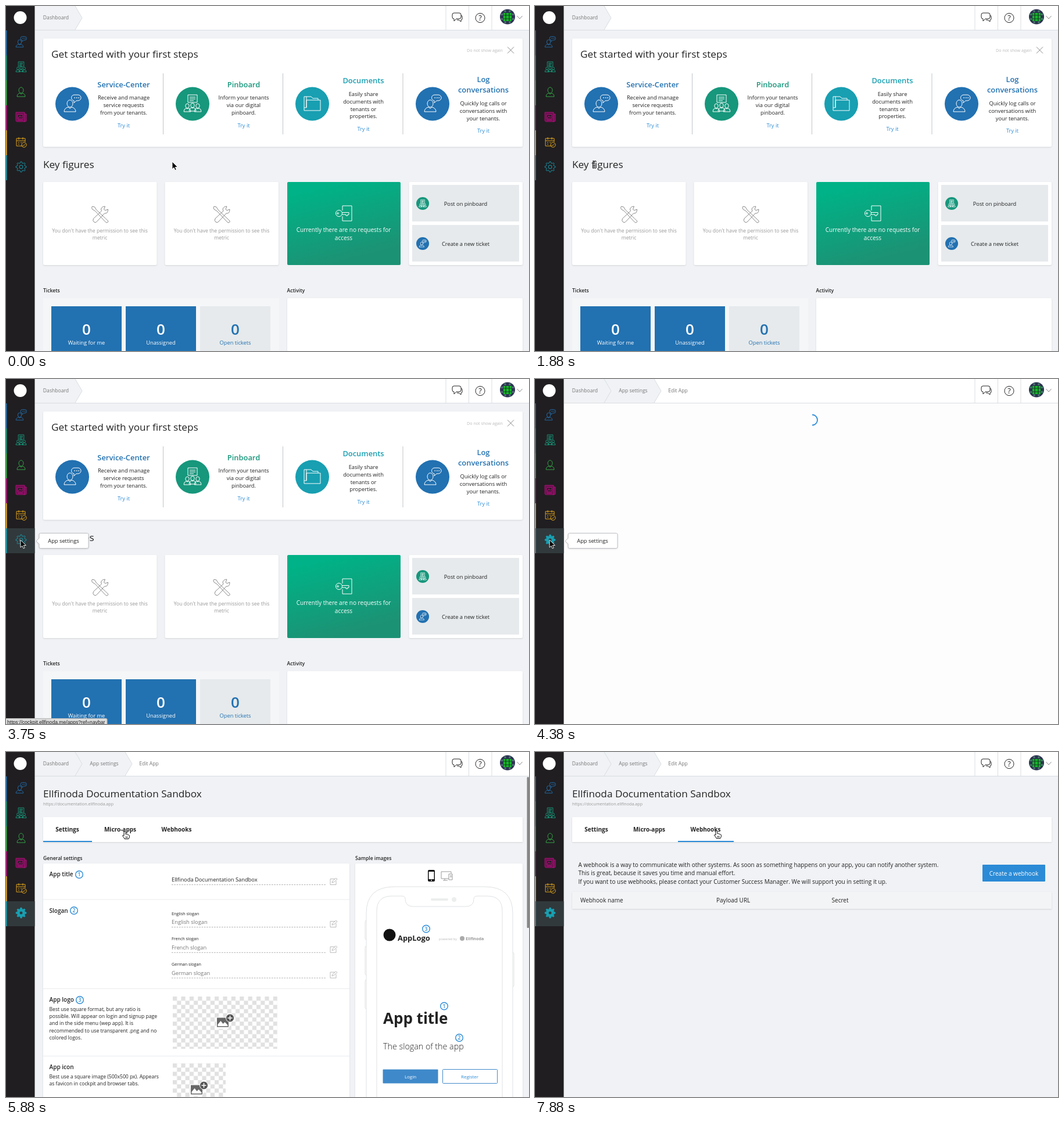
Write an HTML page that moves like this. It is 900 px wide and 594 px high and loops after 8000 ms.

```html
<!DOCTYPE html>
<html lang="en">
<head>
<meta charset="utf-8">
<title>Dashboard to webhooks</title>
<style>
  html, body { margin: 0; width: 100%; height: 100%; overflow: hidden; }
  svg { display: block; width: 900px; height: 594px; font: 9.3px 'Open Sans', sans-serif; fill: #222; }
  #icons * { vector-effect: non-scaling-stroke; }
  .m { text-anchor: middle }
  .xs { font-size: 7.17px } .s { font-size: 8.6px } .l { font-size: 10.04px }
  .xl { font-size: 12.9px } .h { font-size: 17.2px } .n { font-size: 26px }
  .thin { font-weight: 300 } .b { font-weight: 600 } .bb { font-weight: 700 }
  .blue { fill: #2271b1 } .green { fill: #17977c } .teal { fill: #189fb1 }
  .link { fill: #2b8bd6 } .gray { fill: #999 } .mid { fill: #777 } .pale { fill: #bbb } .w { fill: #fff }
  .card { fill: #fff; filter: drop-shadow(0 1px 1px rgba(0, 0, 0, .12)); }
</style>
</head>
<body>
<svg id="stage" viewBox="0 0 900 594"></svg>
<script>
const BRAND = 'Ellfinoda', BLUE = '#2271b1', GREEN = '#17977c', TEAL = '#189fb1', LINK = '#2b8bd6';

const text = (x, y, str, cls = '', lead = 12.8) => str.split('|')
  .map((line, i) => `<text x="${x}" y="${y + i * lead}" class="${cls}">${line}</text>`).join('');
const rect = (x, y, w, h, fill, more = '') =>
  `<rect x="${x}" y="${y}" width="${w}" height="${h}" fill="${fill}" ${more}/>`;
const card = (x, y, w, h, r = 2) => rect(x, y, w, h, '#fff', `rx="${r}" class="card"`);
const disc = (x, y, r, fill) => `<circle cx="${x}" cy="${y}" r="${r}" fill="${fill}"/>`;
const line = (d, stroke, more = '') => `<path d="${d}" fill="none" stroke="${stroke}" ${more}/>`;
const icon = (id, x, y, stroke, scale = 1, more = 'fill="none"') =>
  `<use href="#${id}" transform="translate(${x} ${y}) scale(${scale})" stroke="${stroke}" ${more}/>`;
const badge = (x, y, label) =>
  `<circle cx="${x}" cy="${y}" r="6.3" fill="#fff" stroke="${LINK}" stroke-width="1.4"/>` + text(x, y + 3, label, 'm s b link');

const gear = Array.from({length: 32}, (_, i) => {
  const a = (i - .5) * Math.PI / 16, r = i % 4 < 2 ? 9 : 6.6;
  return (r * Math.cos(a)).toFixed(2) + ',' + (r * Math.sin(a)).toFixed(2);
}).join(' ');

const bust = (x, y) => `<g transform="translate(${x} ${y})"><ellipse rx="3.2" ry="3.8"/>
  <path d="M-6 10q0-5 4-6l2 1 2-1q4 1 4 6z"/></g>`;

const icons = `<defs id="icons">
  <g id="chat"><ellipse cx="-4" cy="0" rx="5" ry="6.2"/><path d="M-14 14q0-6 7-8l3 2.5 3-2.5q7 2 7 8z"/>
    <path d="M3-1l0-4a5 5 0 0 1 1-10h6a5 5 0 0 1 0 10h-3z"/><path d="M3.5-10h1.5m2 0h1.5m2 0h1.5" stroke-width="1.7"/></g>
  <g id="pin"><path d="M-8-15H8V-2H-8zM-5-11H5M-5-8H5M-5-5H2"/>${bust(-9, 4) + bust(9, 4) + bust(0, 3)}</g>
  <g id="person"><ellipse cy="-3" rx="4" ry="5"/><path d="M-7 8q0-5 5-6l2 2 2-2q5 1 5 6z"/></g>
  <g id="news"><path d="M-9-8H6V8H-7q-2 0-2-2zM6-5H9V6q0 2-2 2H5"/><path d="M-6-4H3V3H-6zM-6 5.5H3" fill="#201e21"/><path d="M-5 2l3-4 2 3 2-2"/></g>
  <g id="calendar"><path d="M3 7H-8V-6H7V0M-8-2H7M-4-8v4M3-8v4M-5 1h2m2 0h2M-5 4h2"/><circle cx="5" cy="5" r="4.2"/><path d="M3 5l1.5 1.5L7 3.5"/></g>
  <polygon id="gear" points="${gear}"/>
  <path id="folder" d="M-10 7V-12H-2L1-9H10V-6M-10 7H-14V-12H-10M-10 7V-6H14V12H-14V7"/>
  <path id="tools" d="M-13-14l4 1 3 5L10 7l4 4q1 3-3 3L7 10-8-6l-5-3q-2-3 0-5zM14-9l-5 2-2-2 2-5q-6 0-7 5l1 3-14 13q-2 4 1 6 3 2 5-1L8-2q6 1 6-7z"/>
  <g id="access"><path d="M-2-5V-13H14V13H-2V5"/><circle cx="-8" r="5.5"/><circle cx="-10" r="1.3"/><path d="M-2.5-1.5H9V2H7V4H4V2H-3"/></g>
  <path id="edit" d="M3-4.5H-5V5.5H5V-1M-2 2l1-3 6-5 2 2-6 5z"/>
  <g id="picture"><path d="M-10-8H7V9H-10z" fill="#fff"/><path d="M-13-10H8V7H-13z" fill="#666"/>
    <path d="M-11 5V2l5-6 4 5 3-3 5 5v2z" fill="#fff" stroke="none"/><circle cx="10" cy="-9" r="7" fill="#555"/>
    <path d="M6-9h8M10-13v8" stroke="#fff" stroke-width="1.5"/></g>
  <g id="arrow"><path d="M0 0V13l3-2.7 2 4.5 2.2-1-2-4.3h4.2z" fill="#000" stroke="#fff" stroke-width=".9"/></g>
  <g id="hand"><path d="M0 0q1.5 0 1.5 1.5V5q2-.5 2.5.7 2-.5 2.3.7 1.7 0 1.7 1.7 0 3-1.5 5H-.5Q-1 11-4 8q0-2 2.5-.5v-6Q-1.5 0 0 0zM2 9v2.5M4.2 9v2.5" fill="#fff" stroke="#000"/></g>
  <path id="beam" d="M-2.5-6.5Q0-6.5 0-5 0-6.5 2.5-6.5M0-5V5M-2.5 6.5Q0 6.5 0 5 0 6.5 2.5 6.5M-1.5 2h3" fill="none" stroke="#111"/>
  <pattern id="checker" x="287" y="421" width="14.4" height="14.4" patternUnits="userSpaceOnUse">
    ${rect(0, 0, 14.4, 14.4, '#fff')}<path d="M0 0h7.2v14.4h7.2V7.2H0z" fill="#e1e1e1"/></pattern>
  <linearGradient id="greenFade" x2=".35" y2="1"><stop offset=".15" stop-color="#00b287"/><stop offset="1" stop-color="#1c9274"/></linearGradient>
</defs>`;

const steps = [
  [114, 202.5, 'chat', BLUE, 'blue', 'Service-Center', 140, 'Receive and manage|service requests|from your tenants.', 161, 209],
  [321, 409, 'pin', GREEN, 'green', 'Pinboard', 140, 'Inform your tenants|via our digital|pinboard.', 161, 209],
  [527, 615, 'folder', TEAL, 'teal', 'Documents', 133, 'Easily share|documents with|tenants or|properties.', 155, 215],
  [734, 821.5, 'chat', BLUE, 'blue', 'Log|conversations', 131, 'Quickly log calls or|conversations with|your tenants.', 171, 218],
].map(([cx, tx, id, color, cls, title, ty, body, by, ly]) =>
  disc(cx, 168.5, 29, color) + icon(id, cx, 168, '#fff') + text(tx, ty, title, 'm xl b ' + cls, 18.3) +
  text(tx, by, body, 'm') + text(tx, ly, 'Try it', 'm link')).join('');

const denied = x => card(x, 303, 195.5, 143) + icon('tools', x + 97.5, 359, '#8a8a8a') +
  text(x + 97.5, 389.5, "You don't have the permission to see this|metric", 'm s gray', 12);
const action = (y, id, color, label) => rect(699, y, 184, 63, '#e6eaec') + disc(717, y + 32, 11, color) +
  icon(id, 717, y + 32, '#fff', .42, 'fill="none" stroke-width=".7"') + text(791, y + 35.5, label, 'm');
const counter = (x, fill, cls, label) => rect(x, 517, 121, 80, fill) +
  text(x + 60.5, 566, '0', 'm n b ' + cls) + text(x + 60.5, 583, label, 'm ' + cls);

const dashboard = rect(50, 41, 850, 553, '#f0f2f5') + card(64, 56, 825, 186.5) +
  text(78, 89, 'Get started with your first steps', 'h') + text(793, 78.5, 'Do not show again', 'xs pale') +
  line('M863 70.5l11 11m0-11l-11 11', '#888') + line('M270.5 116V221M476.5 116V221M683 116V221', '#bfc4c9') + steps +
  text(64, 279, 'Key figures', 'h') + denied(64) + denied(273.5) +
  rect(484, 303, 195, 143, 'url(#greenFade)', 'rx="2"') + icon('access', 581, 357, '#fff') +
  text(581, 388.5, 'Currently there are no requests for|access', 'm l w', 14.5) +
  card(693.5, 303, 195.5, 143) + action(308, 'pin', GREEN, 'Post on pinboard') + action(377, 'chat', BLUE, 'Create a new ticket') +
  text(64, 493, 'Tickets', 's b') + text(483.5, 493, 'Activity', 's b') +
  rect(64, 503, 406, 91, '#f5f6f7') + card(484, 503, 405, 100) +
  counter(78, BLUE, 'w', 'Waiting for me') + counter(206, BLUE, 'w', 'Unassigned') + counter(334, '#e6eaec', 'blue', 'Open tickets');

const loading = rect(50, 41, 850, 553, '#fdfdfe') +
  `<g id="spinner">${line('M477 61.5A9 9 0 0 1 477 79.5', LINK, 'stroke-width="1.8"')}</g>`;

const appHead = rect(50, 41, 850, 553, '#f0f2f5') + text(64, 78, BRAND + ' Documentation Sandbox', 'h') +
  text(64, 91.5, `https://documentation.${BRAND.toLowerCase()}.app`, 'xs gray') + card(64, 112, 825, 43, 0) +
  text(105.5, 136.5, 'Settings', 'm l bb') + text(196.5, 136.5, 'Micro-apps', 'm l bb') + text(293.5, 136.5, 'Webhooks', 'm l bb');

const field = (y, str, cls) => text(285, y, str, cls) +
  line(`M285 ${y + 5.5}H551`, '#999', 'stroke-dasharray="2.5 1.8" stroke-width=".8"') + icon('edit', 563, y, '#aaa', 1, 'fill="none" stroke-width=".8"');
const slogans = ['English', 'French', 'German'].map((lang, i) =>
  text(285, 280.5 + i * 43.8, lang + ' slogan', 'xs') + field(296 + i * 43.8, lang + ' slogan', 'mid')).join('');

const phone = line('M620 594V278Q620 232 668 232H824Q872 232 872 278V594', '#dfe1e3') +
  line('M620 290q-2 0-2 3v28q0 2 2 2m0 11q-2 0-2 3v45q0 2 2 2m0 8q-2 0-2 3v45q0 2 2 2M872 345q2 0 2 3v54q0 2-2 2', '#dfe1e3') +
  line('M638 594V274Q638 248 664 248H681Q687 248 687 253 687 266 701 266H791Q805 266 805 253 805 248 811 248H828Q854 248 854 274V594', '#dfe1e3') +
  rect(731, 252, 30, 4, '#eceded', 'rx="2"') + disc(771, 254, 4, '#eceded') +
  rect(726, 203, 12, 20, '#111', 'rx="2"') + rect(727.5, 206, 9, 13, '#fff') + disc(732, 221, 1, '#fff') +
  line('M762 218H749V206H766V209M755 218v3m-3 0h8M762 210H768V220H762zM764 213h3m-3 2h3', '#999') +
  disc(660, 315, 10.5, '#111') + text(674, 325, 'AppLogo', 'xl bb') + badge(723, 304.5, '3') +
  `<g font-size="5.7">${text(745, 324, 'powered by', 'pale')}</g>` + disc(785, 321, 4, '#aaa') + text(791, 324, BRAND, 'xs bb gray') +
  text(649, 468, 'App title', 'n bb') + badge(754, 437.5, '1') +
  `<g font-size="14.3">${text(649, 512, 'The slogan of the app', 'thin')}</g>` + badge(780, 492, '2') +
  rect(648.5, 546.5, 95, 24, '#3f89ca', 'rx="1"') + rect(751.5, 546.5, 94, 24, '#fff', 'rx="1" stroke="#3f89ca"') +
  `<g font-size="7.9">${text(696, 561.5, 'Login', 'm w') + text(798, 561.5, 'Register', 'm link')}</g>`;

const settings = appHead + rect(64, 153, 84, 2, LINK) + rect(896.5, 43, 3.5, 260, '#858585', 'rx="1.5"') +
  text(64, 186, 'General settings', 's b') + text(601, 186, 'Sample images', 's b') +
  card(64, 192, 527, 410) + card(601, 192, 288, 410) + line('M64 254H591M64 407.5H591M64 523.5H591', '#e9ebee') +
  text(74.5, 214, 'App title', 'l b') + badge(126, 211, '1') + field(223, BRAND + ' Documentation Sandbox') +
  text(74.5, 276.5, 'Slogan', 'l b') + badge(117, 273, '2') + slogans +
  text(74.5, 430, 'App logo', 'l b') + badge(127, 427, '3') +
  text(74.5, 446, 'Best use square format, but any ratio is|possible. Will appear on login and signup page|and in the side menu (wep app). It is|recommended to use transparent .png and no|colored logos.', 's', 12.2) +
  rect(287, 421, 180, 90, 'url(#checker)') + icon('picture', 375.5, 467, '#fff') +
  text(74.5, 545.5, 'App icon', 'l b') +
  text(74.5, 562, 'Best use a square image (500x500 px). Appears|as favicon in cockpit and browser tabs.', 's', 12.2) +
  rect(287, 536, 91, 58, 'url(#checker)') + icon('picture', 330.5, 583, '#fff') + phone;

const webhooks = appHead + rect(246, 153, 96, 2, LINK) + card(64, 241, 825, 29, 0) + rect(64, 241, 825, 29, '#f3f4f6') +
  `<g id="hooks">${text(74.5, 198, 'A webhook is a way to communicate with other systems. As soon as something happens on your app, you can notify another system.|This is great, because it saves you time and manual effort.|If you want to use webhooks, please contact your Customer Success Manager. We will support you in setting it up.', 'l', 14.3) +
  rect(770, 194, 108, 29, LINK, 'rx="1"') + text(824, 212.5, 'Create a webhook', 'm l w') +
  text(78, 259, 'Webhook name', 'l') + text(312, 259, 'Payload URL', 'l') + text(510.5, 259, 'Secret', 'l')}</g>`;

const crumb = (x, w) => `<path d="M${x} 0H${x + w}L${x + w + 12} 20.5 ${x + w} 41H${x}z" fill="#f0f2f5"/>` +
  line(`M${x + w} 0l12 20.5-12 20.5`, '#d9dde1');
const identicon = disc(863, 18.5, 13, '#2c3350') + rect(856, 12, 14, 14, '#16b52c') +
  line('M860 12v14M866 12v14M856 16h14M856 22h14', '#123c22', 'stroke-width="1.2"') +
  [0, 1, 2, 3, 4, 5, 6, 7].map(i => disc(863 + 10.3 * Math.cos(i * .785 + .39), 18.5 + 10.3 * Math.sin(i * .785 + .39), 1.8, '#4d7a72')).join('');
const header = rect(50, 0, 850, 41, '#fff') + `<g id="subCrumbs">${crumb(119, 86)}${text(169, 23, 'App settings', 'm s mid') + text(246, 23, 'Edit App', 'm s mid')}</g>` +
  crumb(50, 69) + text(86, 23, 'Dashboard', 'm s mid') +
  line('M50 41.5H900M757 0V41M796.5 0V41M836 0V41', '#d9dde1') +
  line('M771 12h9q3 0 3 3v4q0 3-3 3h-5l-4 4v-4q-3 0-3-3v-4q0-3 3-3zM783 16q2 0 2 3v3q0 2-2 2v3l-4-3h-3', '#222', 'stroke-linejoin="round"') +
  `<circle cx="816" cy="20.5" r="8" fill="none" stroke="#222"/>` + text(816, 25, '?', 'm xl') +
  identicon + line('M879.5 17l4.5 5 4.5-5', '#888');

const menu = [['chat', '#2371b0', .63], ['pin', '#17a07f', .6], ['person', '#36b24a', 1], ['news', '#b8107f', 1], ['calendar', '#f4b31c', 1], ['gear', TEAL, 1]];
const sidebar = rect(0, 0, 49.5, 594, '#201e21') + disc(24.5, 20, 11, '#fff') + rect(0, 257, 49.5, 43, '#31393c', 'id="gearRow"') +
  menu.map(([id, color, scale], i) => rect(0, 42 + i * 43, 1.5, 43, color) +
    icon(id, 26, 62 + i * 43, color, scale, `fill="${id == 'news' ? '#6d0f50' : 'none'}" stroke-width=".9" id="menu-${id}"`)).join('') +
  `<circle id="gearHole" cx="26" cy="277" r="3" fill="none" stroke="${TEAL}"/>`;

const tooltip = `<g id="tooltip"><path d="M57 268q0-2.5 2.5-2.5H139.5q2.5 0 2.5 2.5V289q0 2.5-2.5 2.5H59.5q-2.5 0-2.5-2.5V284L52 279l5-5z" stroke="#bcbfc3" class="card"/>${text(99, 282, 'App settings', 'm')}</g>`;
const linkBar = `<g id="linkBar" font-family="Liberation Sans, sans-serif" font-size="8.6">${rect(-1, 584.5, 175, 12, '#dcdcdc', 'rx="2" stroke="#b5b5b5"') + text(2, 593.5, `https://cockpit.${BRAND.toLowerCase()}.me/apps?ref=navbar`)}</g>`;

document.getElementById('stage').innerHTML = icons +
  [dashboard, loading, settings, webhooks].map((page, i) => `<g id="page${i}">${page}</g>`).join('') +
  header + sidebar + tooltip + linkBar + '<use id="cursor"/>';

const $ = id => document.getElementById(id);
const show = (id, on) => $(id).style.display = on ? '' : 'none';

// time, x, y of the pointer's hot spot
const route = [[0, 286, 268], [125, 286, 268], [1750, 102, 273], [2000, 102, 273], [2750, 25, 277], [4500, 25, 277],
  [5250, 173, 208], [5625, 204.5, 136.5], [5875, 204.5, 136.5], [6375, 285, 137], [6875, 285, 137],
  [7375, 299.5, 135], [7500, 302, 135], [7875, 312.5, 135.5], [8000, 312.5, 135.5]];

function pointerAt(t) {
  const i = route.findIndex(p => p[0] > t), [t0, x0, y0] = route[i - 1], [t1, x1, y1] = route[i];
  const k = (t - t0) / (t1 - t0), e = k * k * (3 - 2 * k);
  return [x0 + (x1 - x0) * e, y0 + (y1 - y0) * e];
}

function draw(now) {
  const t = Math.floor(now % 8000 / 125) * 125;
  const page = t < 4250 ? 0 : t < 4875 ? 1 : t < 7625 ? 2 : 3;
  const [x, y] = pointerAt(t);
  const hover = x < 49 && y > 257 && y < 300;
  for (let i = 0; i < 4; i++) show('page' + i, i == page);
  show('subCrumbs', page > 0);
  show('gearRow', hover || page > 0);
  show('tooltip', hover);
  show('linkBar', hover && page == 0);
  $('menu-gear').setAttribute('fill', page ? TEAL : 'none');
  $('gearHole').setAttribute('fill', page ? '#31393c' : 'none');
  $('spinner').setAttribute('transform', `rotate(${(t - 4375) * .4} 477 70.5)`);
  $('hooks').setAttribute('opacity', Math.min(1, Math.max(0, (t - 7500) / 375)));
  const onHeading = page == 0 && x > 64 && x < 152, onTab = page > 1 && y > 112 && y < 155;
  $('cursor').setAttribute('href', onHeading ? '#beam' : onTab ? '#hand' : '#arrow');
  $('cursor').setAttribute('transform', `translate(${x} ${y})`);
  requestAnimationFrame(() => draw(performance.now()));
}
draw(performance.now());
</script>
</body>
</html>
```
